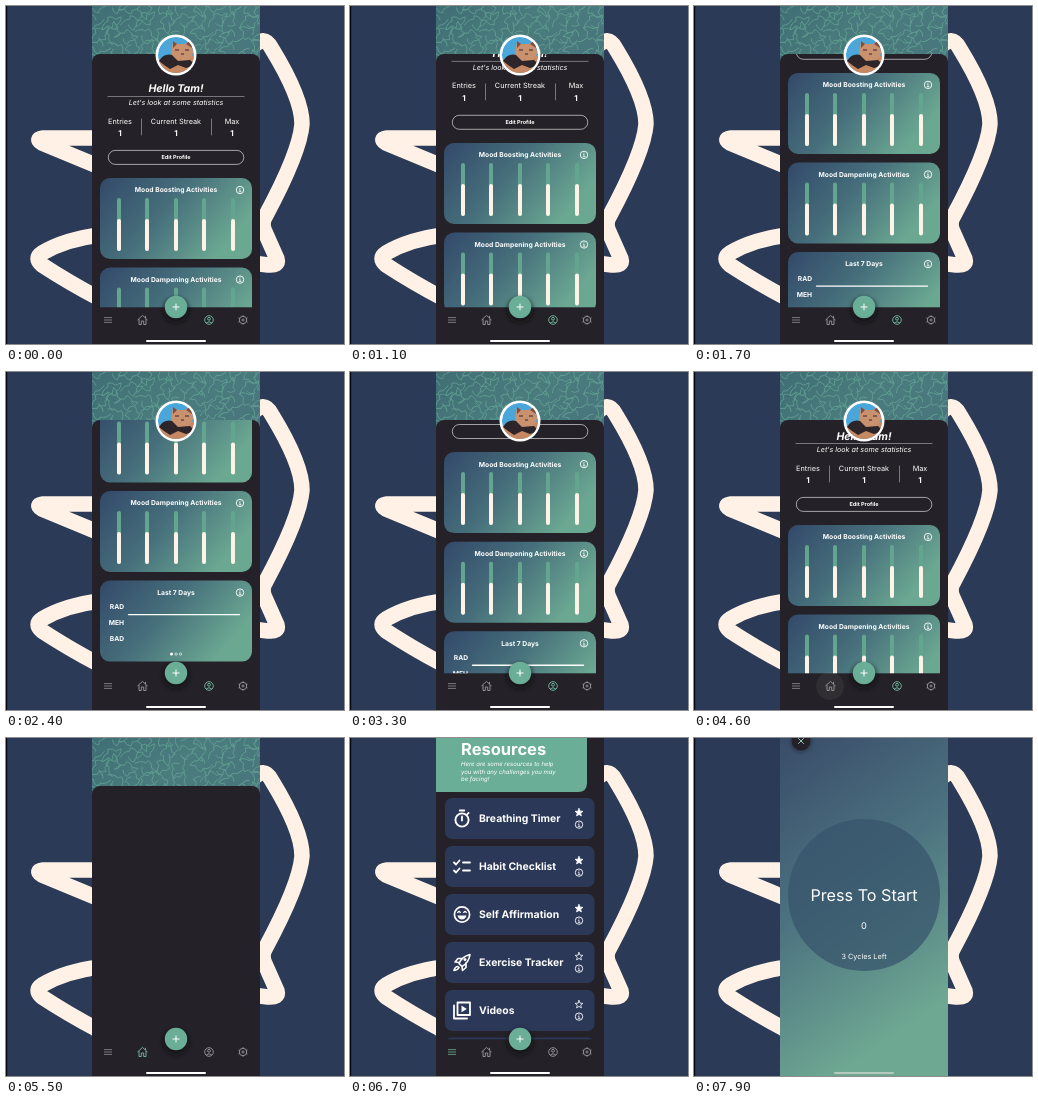
An HTML page that plays this animation: 338 px wide and 338 px high, repeating every 8 s.

```html
<!DOCTYPE html>
<html lang="en">
<head>
<meta charset="utf-8">
<title>Mood diary</title>
<style>
  html, body { margin: 0; width: 100%; height: 100%; overflow: hidden; background: #2b3a56; }
  svg { display: block; width: 100vw; height: 100vh; }
  text { font-family: Inter, "Liberation Sans", sans-serif; fill: #fff; text-rendering: geometricPrecision; }
  .b { font-weight: 700; }
  .i { font-style: italic; }
  .m { text-anchor: middle; }
  .e { text-anchor: end; }
  .line { fill: none; stroke: #fff; stroke-linecap: round; stroke-linejoin: round; }
</style>
</head>
<body>
<svg id="stage" viewBox="0 0 338 338"></svg>
<script>
const LOOP = 8000;
const DARK = '#242228', GREEN = '#6bae97', NAVY = '#2b3858', GREY = '#8e8d92';

const text = (x, y, size, str, cls = 'm') =>
  `<text x="${x}" y="${y}" font-size="${size}" class="${cls}">${str}</text>`;
const rect = (x, y, w, h, fill, r = 0, more = '') =>
  `<rect x="${x}" y="${y}" width="${w}" height="${h}" rx="${r}" fill="${fill}" ${more}/>`;
const circle = (x, y, r, fill, more = '') =>
  `<circle cx="${x}" cy="${y}" r="${r}" fill="${fill}" ${more}/>`;
const line = (d, w = 1, more = '') => `<path class="line" d="${d}" stroke-width="${w}" ${more}/>`;
const at = (x, y, body) => `<g transform="translate(${x} ${y})">${body}</g>`;
const gradient = (id, x2, y2, stops) =>
  `<linearGradient id="${id}" x1="0" y1="0" x2="${x2}" y2="${y2}">` +
  stops.map((c, i) => `<stop offset="${i / (stops.length - 1)}" stop-color="${c}"/>`).join('') +
  '</linearGradient>';

const info = (x, y) => at(x, y, circle(0, 0, 3.7, 'none', 'stroke="#fff" stroke-width=".9"') +
  line('M-.6 -.3H.1V1.8M-.8 1.8H1', .7) + circle(0, -1.8, .55, '#fff'));

function star(x, y, full) {
  let d = '';
  for (let k = 0; k < 10; k++) {
    const a = k * Math.PI / 5, r = k % 2 ? 1.8 : 4.1;
    d += `${k ? 'L' : 'M'}${(Math.sin(a) * r).toFixed(2)} ${(-Math.cos(a) * r).toFixed(2)}`;
  }
  return at(x, y, line(d + 'Z', .8, full ? 'style="fill:#fff"' : ''));
}

// Pointed leaf outlines behind the header, laid on a jittered grid
function leaves() {
  let seed = 11, out = '';
  const rnd = () => (seed = seed * 16807 % 2147483647) / 2147483647;
  for (let y = -2; y < 64; y += 14) {
    for (let x = 86; x < 264; x += 17) {
      const turn = rnd() * 360, px = x + rnd() * 8, py = y + rnd() * 6;
      out += `<path transform="translate(${px} ${py}) rotate(${turn})" ` +
        'd="M-11 4Q-8 -3 -3 -3L-2 -7Q3 -7 5 -3L11 -4Q9 2 4 3L3 7Q-2 6 -3 2"/>';
    }
  }
  return `<g fill="none" stroke="#6caf9b" stroke-width=".9" opacity=".65">${out}</g>`;
}

const backdrop = rect(86, 0, 168, 90, 'url(#top)') + leaves();
const sheet = rect(86, 48, 168, 300, DARK, 8);

const card = (y, title, body) => at(0, y, rect(94, 0, 152, 81, 'url(#card)', 10) +
  text(170, 14.4, 6.75, title, 'b m') + info(234, 12) + body);
const bars = [113, 141, 170, 198, 227].map(x =>
  rect(x - 2, 20, 4, 53, '#64a58f', 2) + rect(x - 2, 41, 4, 32, '#fff3e8', 2)).join('');
const week = ['RAD', 'MEH', 'BAD'].map((s, k) => text(118, 28.5 + 16.2 * k, 6.7, s, 'b e')).join('') +
  line('M122.5 34H233.5', 1.4) + circle(165.5, 73.5, 1.5, '#fff') +
  [170, 174.5].map(x => circle(x, 73.5, 1.2, 'none', 'stroke="#fff" stroke-width=".6"')).join('');
const stat = (x, label) => text(x, 117.6, 7.3, label) + text(x, 129.8, 8, '1', 'b m');

const avatar = circle(170, 49, 20.5, '#fff') + `<g clip-path="url(#face)">` +
  circle(170, 49, 18, '#4ba6da') +
  '<path d="M150 58Q158 47 168 49L190 50V70H150Z" fill="#c58862"/>' +
  '<path d="M165 47L167 35L171 38H179L185 34L187 46Q186 55 177 55Q168 55 165 47Z" fill="#c9916e"/>' +
  '<path d="M167 35L171 38L167 42ZM185 34L180 38L186 42Z" fill="#7d4f40"/>' +
  '<path d="M153 55Q158 47 166 49L172 55L184 54L189 59L180 62L172 59L164 63L158 59Z" fill="#2d2529"/>' +
  '<path d="M169 44H173M179 44H183M175 48H178" stroke="#35262a" stroke-width="1.2"/></g>';

const profile = backdrop + sheet + `<g clip-path="url(#sheet)"><g id="scroll">` +
  text(170, 86.5, 10.6, 'Hello Tam!', 'b i m') +
  line('M102 90.5H238', .6, 'opacity=".65"') +
  text(170, 99.3, 7.2, 'Let\'s look at some statistics', 'i m') +
  stat(114, 'Entries') + stat(170, 'Current Streak') + stat(226, 'Max') +
  line('M135.5 113V129M205.5 113V129', .6, 'opacity=".65"') +
  rect(102.3, 144.4, 135.5, 14, 'none', 7, 'stroke="#fff" stroke-width=".65" stroke-opacity=".9"') +
  text(170, 153.4, 5.5, 'Edit Profile', 'b m') +
  card(172, 'Mood Boosting Activities', bars) +
  card(261.6, 'Mood Dampening Activities', bars) +
  card(351.2, 'Last 7 Days', week) + '</g></g>' + avatar;

const home = backdrop + sheet;

const icons = {
  timer: circle(0, 1.5, 6.6, 'none', 'stroke="#fff" stroke-width="1.9"') +
    line('M-2.3 -8H2.3M0 -2V2M5.2 -4.2L6.6 -5.6', 1.8),
  list: line('M-8 -4L-6 -2L-2.5 -6M-8 4L-6 6L-2.5 2M1 -4H8M1 4H8', 1.8),
  smile: circle(0, 0, 7.6, 'none', 'stroke="#fff" stroke-width="1.7"') +
    line('M-4.3 -2Q-3 -4 -1.7 -2M1.7 -2Q3 -4 4.3 -2', 1.3) +
    '<path d="M-4.5 1H4.5Q3.5 5 0 5Q-3.5 5 -4.5 1Z" fill="#fff"/>',
  rocket: line('M-3 1Q0 -6 8 -8Q7 0 0 4ZM-3 0L-7 -.5L-4 -4L0 -4M0 4L.5 8L4 5L4 0M-4 4Q-7 4 -8 8Q-4 7.5 -3 5', 1.6) +
    circle(3, -3, 1.5, '#fff'),
  video: line('M-4.5 -8H8V4.5H-4.5ZM-8 -5V8H5', 1.8) +
    '<path d="M-.5 -5V1.8L4.8 -1.6Z" fill="#fff"/>'
};

const tools = [
  ['timer', 'Breathing Timer', 1], ['list', 'Habit Checklist', 1], ['smile', 'Self Affirmation', 1],
  ['rocket', 'Exercise Tracker', 0], ['video', 'Videos', 0]
];
const resources = rect(86, 0, 168, 338, DARK) +
  `<path d="M86 0H237V45Q237 54 228 54H86Z" fill="${GREEN}"/>` +
  text(111, 17, 16.5, 'Resources', 'b') +
  ['Here are some resources to help', 'you with any challenges you may', 'be facing!']
    .map((s, k) => text(111, 28.3 + 7.3 * k, 6, s, 'i')).join('') +
  tools.map(([icon, name, full], k) => at(0, 60 + 48 * k,
    rect(95, 0, 149.5, 41, NAVY, 7, k ? '' : 'id="first"') + at(112, 20.5, icons[icon]) +
    text(129, 24.2, 10.4, name, 'b') + star(229, 14.6, full) + info(229, 26.6))).join('') +
  rect(95, 299.5, 149.5, 41, NAVY, 7);

const tab = (id, x, body) => `<g id="${id}" transform="translate(${x} 314)" fill="none" ` +
  `stroke="${GREY}" stroke-width="1" stroke-linejoin="round">${body}</g>`;
const nav = rect(86, 301.3, 168, 37, DARK) +
  circle(136, 314, 14, '#fff', 'id="tapHome"') + circle(102, 314, 14, '#fff', 'id="tapMenu"') +
  tab('menu', 102, '<path d="M-4 -2.4H4M-4 0H4M-4 2.4H4" stroke-width=".8"/>') +
  tab('house', 136.5, '<path d="M-5 0L0 -4.6L5 0M-3.5 -1V4.5H-1.2V1H1.2V4.5H3.5V-1M3 -2V-4.2"/>') +
  tab('person', 203, '<circle r="4.3"/><circle cy="-1.2" r="1.4"/><path d="M-2.8 3Q0 .4 2.8 3"/>') +
  tab('gear', 237, '<circle r="3.7"/><circle r="1"/><path d="M0 -4.8V-3M0 4.8V3M-4.5 -2L-3 -1.3M4.5 2L3 1.3M-4.5 2L-3 1.3M4.5 -2L3 -1.3"/>') +
  circle(170, 304, 13, '#0c0b0e', 'opacity=".6" filter="url(#soft)"') + circle(170, 301, 11.2, GREEN) +
  line('M167 301H173M170 298V304', 1) + rect(140, 334, 60, 2, '#fff', 1);

const breathing = rect(86, 0, 168, 338, 'url(#calm)') +
  circle(170, 157, 76, '#36546b', 'opacity=".72"') +
  text(170, 163, 16.2, 'Press To Start') + text(170, 190.6, 9.2, '0') + text(170, 221, 7.3, '3 Cycles Left') +
  circle(107, 4, 10, '#0c0b0e', 'opacity=".4" filter="url(#soft)"') + circle(107, 3, 9.5, '#242228') +
  line('M104.5 .5L109.5 5.5M109.5 .5L104.5 5.5', 1, 'style="stroke:#8fc9b2"') +
  rect(140, 334, 60, 2, '#b5c9c1', 1);

const scenery = rect(0, 0, 338, 338, '#2b3a56') + rect(0, 0, 1.2, 338, '#07090e') +
  line('M94 132H37Q29 133 36 137L94 161' +
    'M94 229Q60 233 36 247Q28 252 36 259Q62 276 94 293' +
    'M246 42Q258 27 266 43Q296 92 296 118Q294 146 259 211Q255 218 259 226L271 253Q273 260 262 259L246 257',
    15.5, 'style="stroke:#fff1e5"');

const stage = document.getElementById('stage');
stage.innerHTML = '<defs>' +
  gradient('top', 1, .6, ['#3f6e74', '#4a7c7e', '#47757c']) +
  gradient('card', 1, .45, ['#33496a', '#466f7b', '#6ba892']) +
  gradient('calm', .35, 1, ['#394c69', '#4c7280', '#6ea892']) +
  '<filter id="soft" x="-50%" y="-50%" width="200%" height="200%"><feGaussianBlur stdDeviation="2"/></filter>' +
  `<clipPath id="phone">${rect(86, 0, 168, 338, '#000')}</clipPath>` +
  `<clipPath id="sheet">${rect(86, 48, 168, 300, '#000', 8)}</clipPath>` +
  `<clipPath id="face">${circle(170, 49, 18, '#000')}</clipPath></defs>` + scenery +
  `<g clip-path="url(#phone)"><g id="profile">${profile}</g><g id="home">${home}</g>` +
  `<g id="resources">${resources}</g>${nav}<g id="breathing">${breathing}</g></g>`;

const $ = id => document.getElementById(id);
const set = (id, name, value) => $(id).setAttribute(name, value);

// Time and value pairs, joined by straight lines
function track(t, keys) {
  if (t <= keys[0][0]) return keys[0][1];
  for (let k = 1; k < keys.length; k++) {
    const [a, from] = keys[k - 1], [b, to] = keys[k];
    if (t <= b) return from + (to - from) * (t - a) / (b - a);
  }
  return keys[keys.length - 1][1];
}
const SCROLL = [[0, 0], [200, 1], [700, 14], [1100, 35], [1500, 82], [1900, 128], [2200, 141],
  [2400, 142.6], [2700, 142.6], [3000, 124], [3300, 92], [3600, 56], [3900, 30], [4200, 20.5], [4450, 19]];
const tap = (t, start) => track(t, [[start, 0], [start + 100, .055], [start + 250, .055], [start + 450, 0]]);

const HOME_AT = 4800, LIST_AT = 5700, OPEN_AT = 7350;

function draw(t) {
  const page = t < HOME_AT ? 'profile' : t < LIST_AT ? 'home' : 'resources';
  for (const p of ['profile', 'home', 'resources']) set(p, 'display', p === page ? 'inline' : 'none');
  const active = { profile: 'person', home: 'house', resources: 'menu' }[page];
  for (const id of ['menu', 'house', 'person']) set(id, 'stroke', id === active ? GREEN : GREY);

  set('scroll', 'transform', `translate(0 ${-track(t, SCROLL)})`);
  set('tapHome', 'opacity', tap(t, 4500));
  set('tapMenu', 'opacity', tap(t, 5550));
  set('first', 'opacity', track(t, [[7150, 1], [7250, .6], [7400, .6]]));

  const rest = 1 - track(t, [[OPEN_AT, 0], [OPEN_AT + 400, 1]]);
  set('breathing', 'display', t < OPEN_AT ? 'none' : 'inline');
  set('breathing', 'transform', `translate(0 ${350 * rest ** 3})`);
}

const start = performance.now();
function tick() {
  draw((performance.now() - start) % LOOP);
  requestAnimationFrame(tick);
}
draw(0);
requestAnimationFrame(tick);
</script>
</body>
</html>
```
